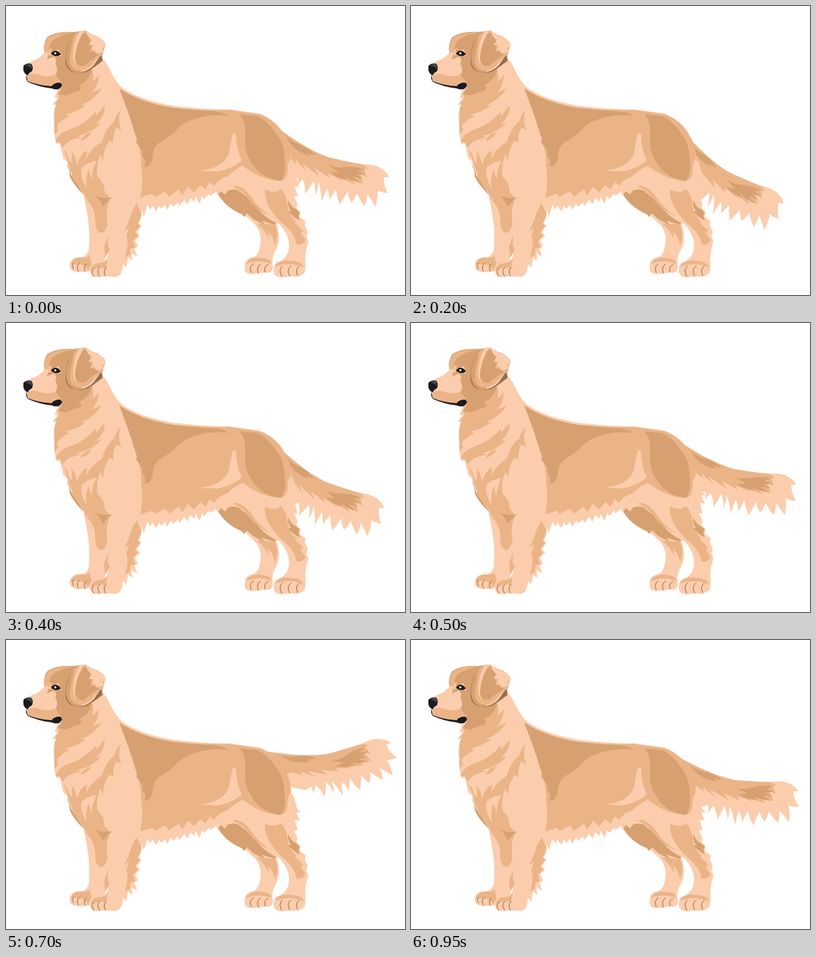
Animation of 550x400 px, one loop 1 s. Source, as an HTML page:

```html
<!DOCTYPE html>
<html lang="en">
<head>
<meta charset="utf-8">
<title>Dog wagging its tail</title>
<style>
html, body { margin: 0; width: 100%; height: 100%; overflow: hidden; background: #fff; }
svg { display: block; width: 100vw; height: 100vh; }
.light { fill: #fbcdac; }
.tan { fill: #eab487; }
.brown { fill: #d6a070; }
.shade { fill: #94704f; }
.black { fill: #1c1a1d; }
.line { fill: none; stroke: #94704f; stroke-width: 1; stroke-linecap: round; }
</style>
</head>
<body>
<svg viewBox="0 0 550 400">
  <g id="tail">
    <path class="light" d="M345 158L364 161C391 181 414 198 443 209Q465 215 490 219Q506 219 514 223Q525 229 528 237L521 237Q520 247 526 259Q517 258 512 255Q513 267 509 278Q503 267 498 260Q498 269 494 277Q487 267 484 259Q481 267 476 272Q472 266 471 257Q466 265 460 275Q456 265 455 254L446 268Q446 260 443 252Q438 262 435 271Q435 257 431 244Q430 254 426 263Q427 252 424 243Q419 251 412 260Q413 249 409 240L401 249L403 238L394 239L380 228L352 195Z"/>
    <path class="tan" d="M345 158L364 161C391 181 414 198 443 209Q468 215 490 219Q497 221 499 226L494 225L497 237L489 232L492 246L476 238L481 247L459 237L466 243L444 232L446 238L425 224L431 235L408 217L414 229L399 212L400 219L388 208L360 205Z"/>
    <path class="brown" d="M386 180Q396 190 408 193Q420 198 427 207L415 203L420 208Q404 203 396 195Q390 189 386 180Z"/>
    <path class="brown" d="M444 220Q454 225 467 223Q482 221 494 226L484 228L495 233L483 233L492 239L478 236L489 245Q473 241 466 235L470 241Q458 239 446 230L459 231Q451 225 444 220Z"/>
  </g>

  <g id="hind-far">
    <path class="light" d="M288 255L330 246L372 299Q380 320 373 336Q365 347 368 362Q367 371 357 369L339 371Q328 371 329 362Q329 350 338 348Q347 348 350 333Q354 316 344 303L331 291Q305 281 290 257Z"/>
    <path class="brown" d="M290 257L326 252Q344 279 373 298L371 303Q361 300 352 297L358 304L341 295L332 287L328 292L325 288Q302 279 290 257Z"/>
    <path class="tan" d="M346 301Q361 302 371 303Q377 316 371 332Q369 319 361 312L363 323Q357 310 346 301ZM330 357Q337 346 354 349Q366 350 365 357Q350 350 330 357Z"/>
    <path class="line" d="M338 369Q334 361 341 357M348 370Q344 361 351 357M357 368Q355 360 361 358"/>
  </g>

  <g id="hind-near">
    <path class="light" d="M300 246L340 221L396 214L402 235L407 238L400 239L405 250L398 249L402 263L397 264L402 274L400 280L406 285L405 292L413 298L412 304L416 313L414 319L417 326Q411 342 413 358L412 369Q404 377 391 374Q374 378 370 371Q367 362 373 355Q388 351 390 335Q392 319 377 302Q355 294 340 271L320 255Q308 252 302 258Z"/>
    <path class="tan" d="M357 254Q372 261 379 253Q387 262 388 274Q389 290 401 299L398 300L410 311L406 314L413 324Q409 332 400 330Q399 315 381 301Q372 293 363 279Q356 266 357 254ZM306 249Q324 245 338 264Q348 281 366 291Q346 284 334 267Q323 251 306 249Z"/>
    <path class="brown" d="M389 269Q394 280 400 281L405 286L403 290L405 297Q394 291 389 284L393 284Q388 278 389 269Z"/>
    <path class="tan" d="M370 361Q377 350 394 353Q407 353 411 362Q392 353 370 361Z"/>
    <path class="line" d="M380 374Q375 365 381 360M391 374Q386 364 393 360M402 373Q398 365 404 360"/>
  </g>

  <g id="front-far">
    <path class="light" d="M106 256L146 263L145 340Q134 346 137 356L116 367L110 368Q90 370 88 362Q87 350 98 348Q111 349 114 338Q117 310 110 277Z"/>
    <path class="tan" d="M107 258L145 264Q136 280 140 302Q136 315 131 314Q123 313 123 296Q123 279 109 266Z"/>
    <path class="tan" d="M89 358Q92 348 102 348Q113 349 115 345L118 357L113 366Q108 354 89 358Z"/>
    <path class="line" d="M93 364Q90 359 93 356M100 367Q96 361 101 356M109 367Q106 360 111 357"/>
  </g>

  <g id="torso">
    <path class="light" d="M72 114L129 69Q138 76 144 90Q151 105 160 113Q184 130 230 138Q274 143 308 143L350 149Q369 157 380 177Q394 195 394 219Q391 242 379 243L325 247Q309 248 302 261L296 256L292 262L289 257L282 263L280 260L273 267L270 263L267 274L261 264L260 271L254 266L250 275L246 268L239 277L237 272L230 278L228 273L222 282L219 275L214 281L211 276L207 284L202 276L199 282L195 275L190 291L187 282Q187 298 182 301L187 304L180 313L185 318L178 324L182 333L177 336L181 347L173 342L174 353L168 348L166 362L161 357Q161 373 151 375L134 374Q118 378 116 369Q115 358 128 356Q138 356 141 345Q139 332 145 307Q140 288 145 268L130 261L112 268L107 261L96 247L90 239L91 233L84 222L85 216L79 211L74 189L70 192Q65 178 67 164Q63 150 70 136L64 137L71 128L67 127Z"/>
    <path class="tan" d="M157 115Q185 133 230 141Q278 145 308 144L350 150Q374 158 386 183Q394 195 392 213Q388 215 388 229Q387 242 376 242Q350 240 326 221Q314 227 305 236Q293 239 287 249L281 244L275 254L268 248L259 258L251 250L243 262L238 254L225 264L219 257L205 264L201 260L185 265Q190 241 186 220Q188 205 178 178Q169 146 157 115Z"/>
    <path class="light" d="M266 228Q298 225 307 205Q310 187 313 176L317 177Q317 197 325 214Q311 226 291 229Z"/>
    <path class="brown" d="M156 114Q185 134 230 141Q270 145 291 146Q302 148 307 152Q279 149 258 157Q240 163 232 175Q222 183 213 188Q202 195 202 212Q198 224 191 222L192 214L187 206L189 202L179 188L181 186Q173 158 156 114Z"/>
    <path class="brown" d="M322 150L346 152Q362 160 372 176Q383 188 384 211Q387 231 379 242Q351 239 338 216Q327 200 330 179Q331 160 322 150Z"/>
    <path class="tan" d="M72 121L88 112L100 95L119 88Q122 100 118 106L128 96Q127 112 118 120L132 114Q122 130 104 137L110 138Q95 148 82 150L87 153Q76 157 70 166L72 172L67 178Q66 160 67 150Q66 141 70 135L66 137L73 128Z"/>
    <path class="brown" d="M73 104L82 86L100 92L119 88Q114 104 100 110Q107 112 101 117Q90 120 83 124L71 122L77 113Z"/>
    <path class="tan" d="M68 188Q72 176 90 170Q108 164 124 146L124 152L136 138Q137 152 124 163L131 162Q118 176 98 180L104 182Q86 184 78 196L74 189ZM103 187Q106 177 118 175Q113 184 103 187Z"/>
    <path class="tan" d="M158 144Q153 158 159 172L152 168Q147 178 148 190L143 186Q134 198 134 214L130 206Q124 220 126 236Q136 244 136 258L144 266L132 276L124 266L112 267Q101 248 93 240Q88 222 79 198L85 206Q86 214 90 218Q92 208 90 200Q97 210 98 220Q102 204 112 200L110 212Q118 196 132 188Q138 168 149 160Q152 150 158 144Z"/>
    <path class="light" d="M104 224Q102 238 111 252Q109 236 114 226L118 240Q119 224 125 214Q113 216 104 224Z"/>
    <path class="brown" d="M86 216Q87 234 98 246L108 262Q94 249 88 236ZM119 259Q127 268 147 265Q138 270 134 278Q130 268 119 259Z"/>
    <path class="tan" d="M180 273L187 288L182 301L185 304L178 313L182 318L175 325L178 334L171 336L171 344L164 348Q170 330 166 318L170 306L163 312Q171 295 173 286ZM141 317L140 330L143 337L137 348L135 334Z"/>
    <path class="tan" d="M117 366Q119 355 129 356Q138 355 140 349L138 364Q132 359 117 366Z"/>
    <path class="line" d="M121 374Q116 367 121 363M129 374Q124 367 129 362M137 374Q133 366 138 362"/>
  </g>

  <g id="head">
    <path class="light" d="M26 83Q30 78 44 73L53 65Q50 53 57 43Q70 35 91 36L106 34L130 45L137 52L132 71L119 83L90 98L77 107Q70 116 63 113Q45 111 31 105Q27 100 28 95Z"/>
    <path class="brown" d="M53 65Q51 53 57 43Q70 34 95 36L109 35L112 67L103 92L95 106Q84 108 77 107Q66 106 68 96Q73 88 68 80Q71 73 66 70L56 74Q60 67 57 62Z"/>
    <path class="tan" d="M53 65Q52 51 59 43Q72 36 95 36Q74 40 64 48Q59 54 60 62Z"/>
    <path class="tan" d="M30 97Q36 91 48 96Q58 99 68 95L77 106L66 106L64 112Q46 110 31 104Z"/>
    <path class="shade" d="M89 45Q81 64 83 76Q85 90 98 92Q112 92 121 82L132 66L133 76L121 85Q111 94 97 92Q82 90 82 75Q82 58 89 45Z"/>
    <path class="tan" d="M94 40Q101 34 110 34Q116 39 126 42Q136 48 137 55Q134 62 134 67Q125 72 119 81Q109 91 98 89Q87 86 88 72Q90 56 94 40Z"/>
    <path class="brown" d="M105 38Q97 52 95 72Q96 84 108 83Q117 74 128 68L119 62L116 64L118 54L113 54L117 48L111 37Z"/>
    <path class="light" d="M101 36L108 34Q100 46 97 58Q93 72 97 82Q91 76 93 62Q95 46 101 36ZM110 34Q116 40 126 43Q137 47 138 55L132 59L136 62L130 65L125 65L121 60L118 63L120 54L115 54L118 47Q111 42 110 34Z"/>
    <path class="light" d="M58 67Q59 59 64 58Q60 63 62 69ZM69 62Q73 57 74 64L77 68L74 70Z"/>
    <path class="black" d="M62 66Q66 60 72 63L76 67Q70 71 65 68Z"/>
    <circle cx="68" cy="65.5" r="1.4" fill="#fff"/>
    <path class="black" d="M24 83Q28 78 35 80Q38 84 36 90Q32 92 30 96Q25 94 24 89Z"/>
    <path d="M27 82Q32 79 35 81L36 87L32 84Z" fill="#4a494f"/>
    <path class="black" d="M28 95L30 104Q45 110 63 111Q66 106 74 106Q79 108 76 112Q72 118 63 114Q45 112 30 105Q27 101 28 95Z"/>
  </g>
</svg>
<script>
const LOOP = 1000, STEP = 50;
// Tail swing: [time in ms, degrees]
const swing = [
  [0, 0], [200, 11.6], [250, 14.8], [400, 6.1], [550, -9],
  [600, -13.4], [700, -28.2], [800, -20.6], [950, -8.5]
];
const tail = document.getElementById("tail");

function angleAt(t) {
  let i = 1;
  while (i < swing.length - 1 && swing[i][0] < t) i++;
  const [t0, a0] = swing[i - 1], [t1, a1] = swing[i];
  return a0 + (a1 - a0) * (t - t0) / (t1 - t0);
}

function draw(ms) {
  const t = Math.floor((ms % LOOP) / STEP) * STEP;
  tail.setAttribute("transform", `rotate(${angleAt(t)} 341 185)`);
}

const start = performance.now();
function tick() {
  draw(performance.now() - start);
  requestAnimationFrame(tick);
}
tick();
</script>
</body>
</html>
```
